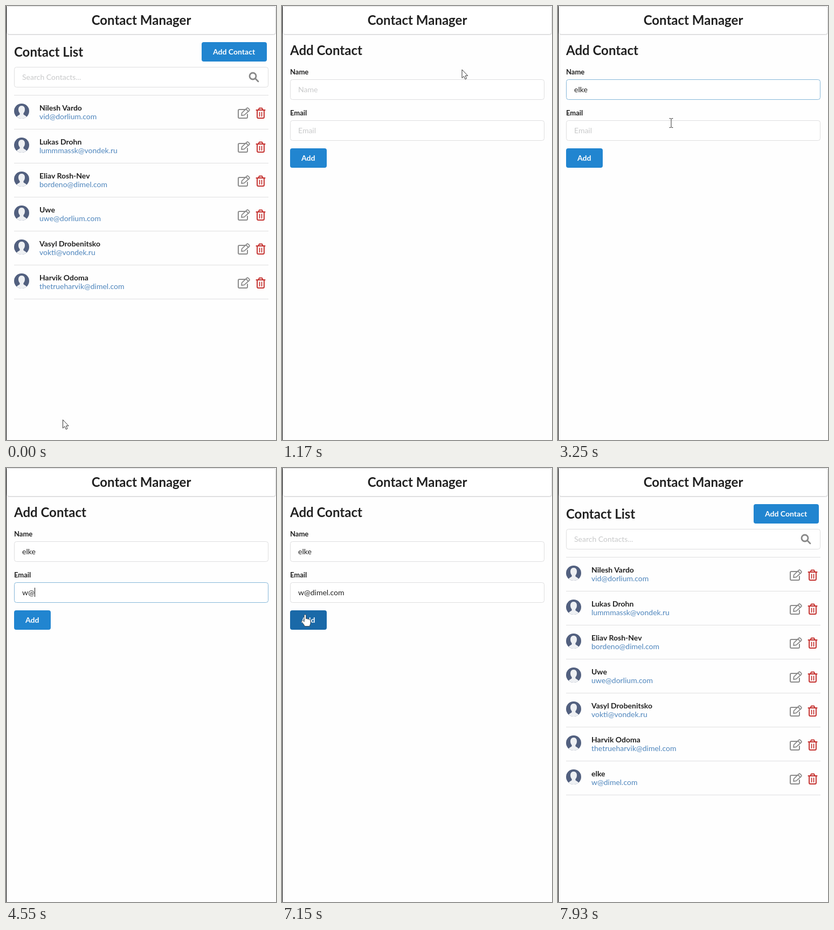
These frames come from a looping animation (501x805 px, 8 s). An HTML page:

```html
<!DOCTYPE html>
<html lang="en">
<head>
<meta charset="utf-8">
<title>Contact Manager</title>
<style>
  html, body { margin: 0; width: 100%; height: 100%; overflow: hidden; background: #fefefe; }
  svg { display: block; }
  text { font: 14px Lato, sans-serif; fill: #212121; white-space: pre; }
  .h { font-size: 24px; font-weight: 700; }
  .b { font-weight: 700; }
  .label { font-size: 13px; font-weight: 700; }
  .btn { font-weight: 700; fill: #fff; }
  .mail { fill: #4f86bd; }
  .hint { fill: #c8c9ca; }
  .line { fill: none; stroke-linecap: round; stroke-linejoin: round; }
</style>
</head>
<body>
<svg id="stage" width="501" height="805" viewBox="0 0 501 805">
  <defs>
    <clipPath id="round"><circle r="14"/></clipPath>
    <g id="avatar">
      <circle r="14" fill="#52607f"/>
      <path clip-path="url(#round)" fill="#eef0f3"
        d="M0-10C4-10 6-7 6-3C6 0 5 2 3.4 4V6C5 8 9 8 10.5 14H-10.5C-9 8-5 8-3.4 6V4C-5 2-6 0-6-3C-6-7-4-10 0-10Z"/>
    </g>
    <g id="edit" class="line" stroke="#8b8b8b" stroke-width="2">
      <path d="M4-7H-8Q-10-7-10-5V7Q-10 9-8 9H5Q7 9 7 7V2"/>
      <path stroke-width="1.8" d="M-4 4L-3.4-.6L6-9.6Q7.2-10.4 8.4-9.4L10.4-7.4Q11.4-6.2 10.4-5L1 3.4ZM4.4-7.8L8.6-3.4"/>
    </g>
    <g id="trash" class="line" stroke="#c4302e" stroke-width="2">
      <path d="M-8-6H8M-4-6.4L-2.6-9.4H2.6L4-6.4M-6.4-5.6V7Q-6.4 9-4.6 9H4.6Q6.4 9 6.4 7V-5.6"/>
      <path stroke-width="1.7" d="M-2-2V5.4M2-2V5.4"/>
    </g>
    <path id="arrow" fill="#fff" stroke="#333" d="M.5 .5V16L4 12.8L6.4 18.2L9 17L6.6 11.8H11.2Z"/>
    <path id="hand" fill="#fff" stroke="#333" stroke-width=".8"
      d="M-1.8 1.5C-1.8-.6 1.6-.6 1.6 1.5V8C2.2 6.6 4.6 7 4.6 8.6C5.4 7.6 7.4 8 7.4 9.6C8.4 8.8 10 9.4 10 11V15.5C10 18 8.4 19 8.4 21.5H-1C-1 18.8-6.6 14.6-6.6 12.2C-6.6 10.4-4 10.4-1.8 13.2Z"/>
    <path id="ibeam" class="line" stroke="#333" d="M-3-8.5H-1L0-7.5L1-8.5H3M0-7.5V7.5M-3 8.5H-1L0 7.5L1 8.5H3"/>
  </defs>
  <rect width="1" height="805"/>
  <rect x="2" y="1.5" width="498.5" height="52.5" rx="4" fill="#222426" opacity=".1"/>
  <rect x="1.5" y=".5" width="499" height="52" rx="4" fill="#fff" stroke="#d8d8d9"/>
  <text class="h" x="251" y="35" text-anchor="middle">Contact Manager</text>
  <g id="view"></g>
</svg>
<script>
const LOOP = 8000, STEP = 130;
const view = document.getElementById('view');

const newName = 'elke', newMail = 'w@dimel.com';
const contacts = [
  ['Nilesh Vardo', 'vid@dorlium.com'],
  ['Lukas Drohn', 'lummmassk@vondek.ru'],
  ['Eliav Rosh-Nev', 'bordeno@dimel.com'],
  ['Uwe', 'uwe@dorlium.com'],
  ['Vasyl Drobenitsko', 'vokti@vondek.ru'],
  ['Harvik Odoma', 'thetrueharvik@dimel.com'],
  [newName, newMail]
];

// Times of focus and of each typed character
const nameFocus = 1300, mailFocus = 3380;
const nameKeys = [1950, 2080, 2210, 2340];
const mailKeys = [4160, 4550, 4940, 5070, 5200, 5330, 5460, 5720, 5850, 5980, 6110];
const submitTime = 7150;

// Pointer paths: [time, x, y]; the pointer is hidden outside them
const paths = [
  [[0, 105, 767], [130, 120, 735], [390, 290, 330], [520, 400, 110], [650, 417, 76],
   [1040, 417, 80], [1300, 250, 155], [1949, 250, 155]],
  [[2730, 250, 157], [3380, 200, 232], [4159, 200, 232]],
  [[6890, 110, 236], [7150, 43, 272], [7280, 40, 276], [7540, 3, 300], [7669, 3, 300]]
];

const text = (x, y, s, cls = '') => `<text class="${cls}" x="${x}" y="${y}">${s}</text>`;
const use = (id, x, y) => `<use href="#${id}" x="${x}" y="${y}"/>`;
const button = (x, y, w, label, pressed) =>
  `<rect x="${x}" y="${y}" width="${w}" height="36" rx="4" fill="${pressed ? '#1a69a8' : '#2185d0'}"/>` +
  text(x + 21, y + 23, label, 'btn');
const box = (y, stroke = '#dededf') =>
  `<rect x="15.5" y="${y + .5}" width="471" height="37" rx="4" fill="#fff" stroke="${stroke}"/>`;
const divider = y => `<rect x="15" y="${y}" width="472" height="1" fill="#dfdfe0"/>`;

function listPage(count, pressed) {
  const rows = contacts.slice(0, count).map(([name, mail], i) => {
    const y = 166 + 63 * i;
    return use('avatar', 29, y + 29) + text(62, y + 28, name, 'b') + text(62, y + 44, mail, 'mail') +
      use('edit', 441, y + 33) + use('trash', 472.5, y + 33) + divider(y + 62);
  });
  return text(15, 94, 'Contact List', 'h') + button(363, 67, 121, 'Add Contact', pressed) +
    box(113) + text(30, 137, 'Search Contacts...', 'hint') +
    '<g class="line" stroke="#888" stroke-width="2.8"><circle cx="458" cy="130" r="6"/><path d="M462.8 134.8L468 140"/></g>' +
    divider(165) + rows.join('');
}

function field(y, label, value, focused) {
  return text(15, y - 9, label, 'label') + box(y, focused ? '#85b7d9' : undefined) +
    (value ? text(30, y + 24, value, 'value') : text(30, y + 24, label, 'hint'));
}

function formPage(t) {
  const typed = (s, keys) => s.slice(0, keys.filter(k => k <= t).length);
  const onName = t >= nameFocus && t < mailFocus, onMail = t >= mailFocus && t < submitTime;
  return text(15, 91, 'Add Contact', 'h') +
    `<g id="name">${field(136, 'Name', typed(newName, nameKeys), onName)}</g>` +
    `<g id="mail">${field(212, 'Email', typed(newMail, mailKeys), onMail)}</g>` +
    button(15, 264, 68, 'Add', t >= submitTime);
}

function addCaret(t) {
  if (t < nameFocus || t >= submitTime) return;
  const lastInput = [nameFocus, ...nameKeys, mailFocus, ...mailKeys].filter(k => k <= t).pop();
  if (Math.floor((t - lastInput) / 510) % 2) return;
  const onMail = t >= mailFocus;
  const value = view.querySelector(onMail ? '#mail .value' : '#name .value');
  const x = 30 + Math.round(value ? value.getComputedTextLength() : 0);
  view.insertAdjacentHTML('beforeend', `<rect x="${x}" y="${onMail ? 222 : 146}" width="1" height="17" fill="#111"/>`);
}

function pointer(t, form) {
  const path = paths.find(p => t >= p[0][0] && t <= p[p.length - 1][0]);
  if (!path) return '';
  const i = path.findIndex(p => p[0] >= t) || 1;
  const [t0, x0, y0] = path[i - 1], [t1, x1, y1] = path[i];
  const k = (t - t0) / (t1 - t0), x = x0 + (x1 - x0) * k, y = y0 + (y1 - y0) * k;
  const within = (l, top, w, h) => x >= l && x < l + w && y >= top && y < top + h;
  const overButton = form ? within(15, 264, 68, 36) : within(363, 67, 121, 36);
  const overField = form ? within(15, 136, 472, 38) || within(15, 212, 472, 38) : within(15, 113, 472, 38);
  return use(overButton ? 'hand' : overField ? 'ibeam' : 'arrow', x, y);
}

let shown = -1;
function draw() {
  const t = Math.floor(performance.now() % LOOP / STEP) * STEP;
  if (t !== shown) {
    shown = t;
    const form = t >= 780 && t < 7280;
    view.innerHTML = form ? formPage(t) : listPage(t < 780 ? 6 : 7, t === 650);
    if (form) addCaret(t);
    view.insertAdjacentHTML('beforeend', pointer(t, form));
  }
  requestAnimationFrame(draw);
}
draw();
</script>
</body>
</html>
```
